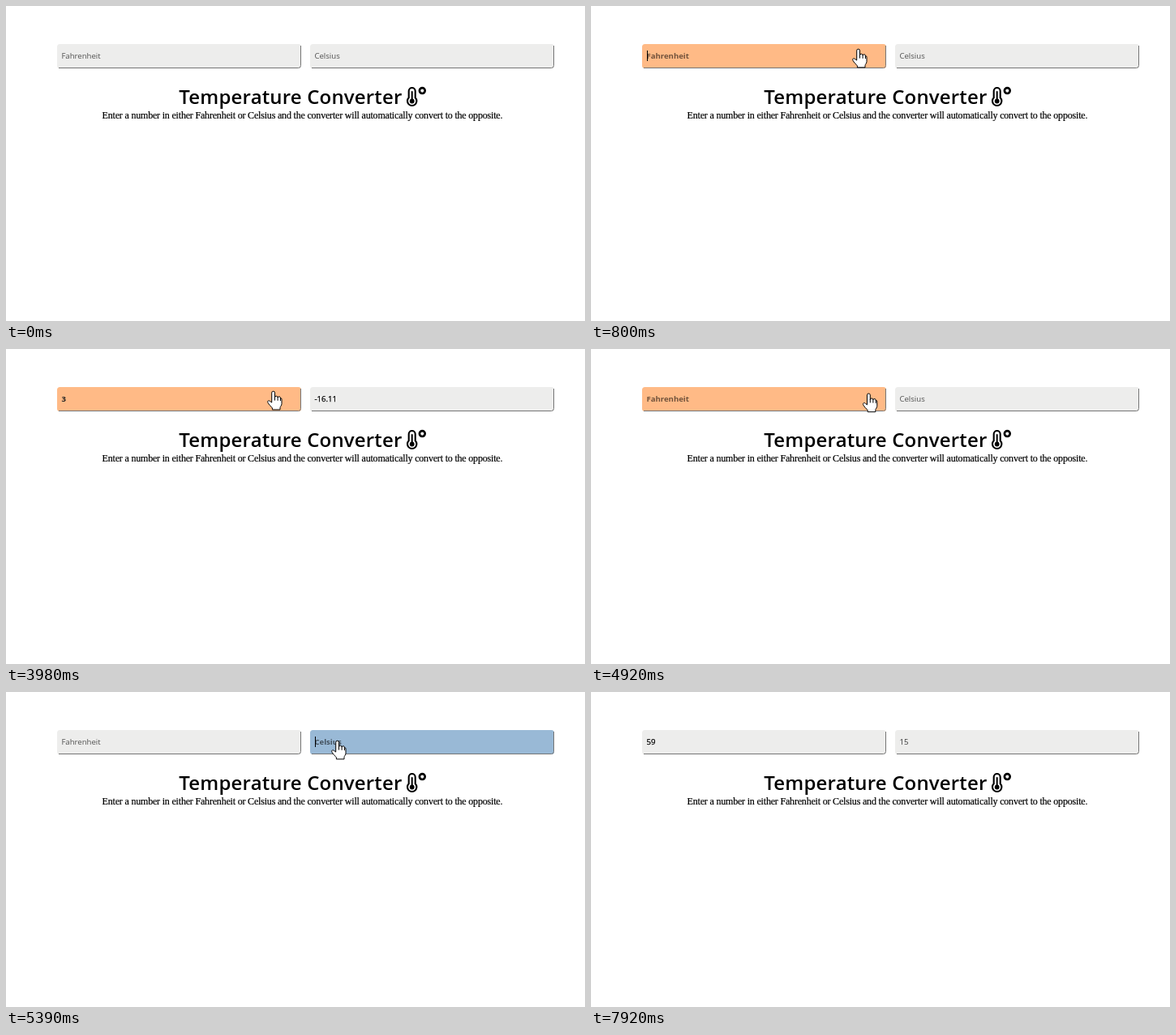
An HTML page for the animation above (8270 ms loop, 714 by 389 pixels).

```html
<!DOCTYPE html>
<html lang="en">
<head>
<meta charset="utf-8">
<title>Temperature Converter</title>
<style>
  html, body { margin: 0; width: 100%; height: 100%; overflow: hidden; background: #fff; }
  svg { display: block; width: 714px; height: 389px; }
  .field text { font: 400 9.6px "Open Sans", sans-serif; fill: #000; stroke: #000; stroke-width: .25; }
  .field .bg { fill: #ededec; }
  .field .edge { fill: none; stroke: #757575; }
  .field.focus text { fill: #333; stroke: none; }
  .field.hover text { font-weight: 700; fill: #222; stroke: none; }
  .field.empty text { fill: #000; fill-opacity: .66; stroke: none; }
  .field.empty.hover text { fill-opacity: .56; }
  #fahr.hover .bg { fill: #ffba86; }
  #cels.hover .bg { fill: #99b9d6; }
  .title { font: 600 24px "Open Sans", sans-serif; letter-spacing: .17px; }
  .note { font: 12px "Liberation Serif", serif; letter-spacing: -.19px; stroke: #000; stroke-width: .2; }
  .cursor { fill: #fff; stroke: #000; stroke-width: 1; stroke-linejoin: round; stroke-linecap: round; }
</style>
</head>
<body>
<svg viewBox="0 0 714 389">
  <g id="fahr" class="field" transform="translate(63 47)">
    <rect class="bg" width="301" height="30" rx="3.5"/>
    <path class="edge" d="M300.5 2V26.5a3 3 0 0 1-3 3H2"/>
    <text x="5.4" y="18"></text>
  </g>
  <g id="cels" class="field" transform="translate(375 47)">
    <rect class="bg" width="301" height="30" rx="3.5"/>
    <path class="edge" d="M300.5 2V26.5a3 3 0 0 1-3 3H2"/>
    <text x="5.4" y="18"></text>
  </g>
  <rect id="caret" y="55" width="1" height="13"/>

  <text class="title" x="213.3" y="121">Temperature Converter</text>
  <g fill="none" stroke="#000" stroke-linecap="round">
    <path stroke-width="2.1" d="M496.7 113.3V105a4 4 0 0 1 8 0V113.3a5.7 5.7 0 1 1-8 0z"/>
    <path stroke-width="2" d="M500.7 117.5V106"/>
    <circle cx="500.7" cy="117.5" r="2.9" fill="#000" stroke="none"/>
    <circle cx="513.3" cy="104.6" r="3.4" stroke-width="2.7"/>
  </g>
  <text class="note" x="118.6" y="139">Enter a number in either Fahrenheit or Celsius and the converter will automatically convert to the opposite.</text>

  <g id="hand" class="cursor">
    <path d="M-2.5 14V2.4a1.9 1.9 0 0 1 3.8 0V8.2a1.8 1.8 0 0 1 3.6 .1a1.7 1.7 0 0 1 3.3 .8a1.4 1.4 0 0 1 1.6 1.6V16c0 2-2 3.4-2 5V23.2H-1.8V21.2C-3.5 19-6 17-7.2 14.6c-1-2 .7-3.4 2.4-2z"/>
    <path fill="none" d="M1.3 8.2V11.5M4.9 8.4V11.7M8.2 9.2V12"/>
  </g>
  <path id="arrow" class="cursor" d="M0 0V16.5L3.9 12.9L6.4 18.6L8.8 17.6L6.4 12H11.6z"/>
</svg>
<script>
const LOOP = 8270;
const $ = id => document.getElementById(id);

// Each step changes only the keys it names.
const steps = [
  [0,    { f: '', c: '', hover: '', focus: '', caret: 0, hand: null, arrow: null }],
  [260,  { arrow: [524, 257] }],
  [330,  { arrow: [475, 186] }],
  [400,  { arrow: [397, 108] }],
  [470,  { arrow: null, hand: [343, 65], hover: 'fahr' }],
  [540,  { hand: [330.2, 52.7] }],
  [740,  { focus: 'fahr', caret: 69 }],
  [1130, { hand: [330.2, 51.7] }],
  [1260, { caret: 0 }],
  [1790, { caret: 69 }],
  [1990, { f: '3', c: '-16.11', caret: 75 }],
  [2120, { f: '32', c: '0', caret: 80 }],
  [2320, { caret: 0 }],
  [2850, { caret: 80 }],
  [3380, { caret: 0 }],
  [3980, { f: '3', c: '-16.11' }],
  [4310, { f: '', c: '', caret: 69 }],
  [4460, { caret: 0 }],
  [4920, { hand: [343, 54.5] }],
  [4990, { hand: [361, 59.5], caret: 69 }],
  [5060, { hand: [379.2, 61.7], hover: '' }],
  [5140, { hand: [398, 61], hover: 'cels' }],
  [5260, { hand: [409.2, 59.7], focus: 'cels', caret: 381 }],
  [5790, { caret: 0 }],
  [6320, { f: '33.8', c: '1', caret: 386 }],
  [6390, { f: '59', c: '15', caret: 392 }],
  [6850, { caret: 0 }],
  [7380, { hand: [413, 63.5], caret: 392 }],
  [7450, { hand: [426.2, 75.7] }],
  [7520, { hand: null, arrow: [452, 335], hover: '', caret: 391 }],
  [7590, { arrow: null }],
  [7920, { caret: 0 }]
];

let acc = {};
const states = steps.map(([at, change]) => ({ at, ...(acc = { ...acc, ...change }) }));

function drawField(id, value, hint, s) {
  const el = $(id);
  el.classList.toggle('hover', s.hover === id);
  el.classList.toggle('focus', s.focus === id);
  el.classList.toggle('empty', !value);
  el.querySelector('text').textContent = value || hint;
}

function place(id, pos) {
  $(id).style.display = pos ? '' : 'none';
  if (pos) $(id).setAttribute('transform', `translate(${pos})`);
}

function draw(s) {
  drawField('fahr', s.f, 'Fahrenheit', s);
  drawField('cels', s.c, 'Celsius', s);
  $('caret').style.display = s.caret ? '' : 'none';
  $('caret').setAttribute('x', s.caret);
  place('hand', s.hand);
  place('arrow', s.arrow);
}

let shown = null;
const start = performance.now();
function tick() {
  const t = Math.max(0, performance.now() - start) % LOOP;
  const s = states.filter(x => x.at <= t).pop();
  if (s !== shown) draw(shown = s);
  requestAnimationFrame(tick);
}
tick();
</script>
</body>
</html>
```
